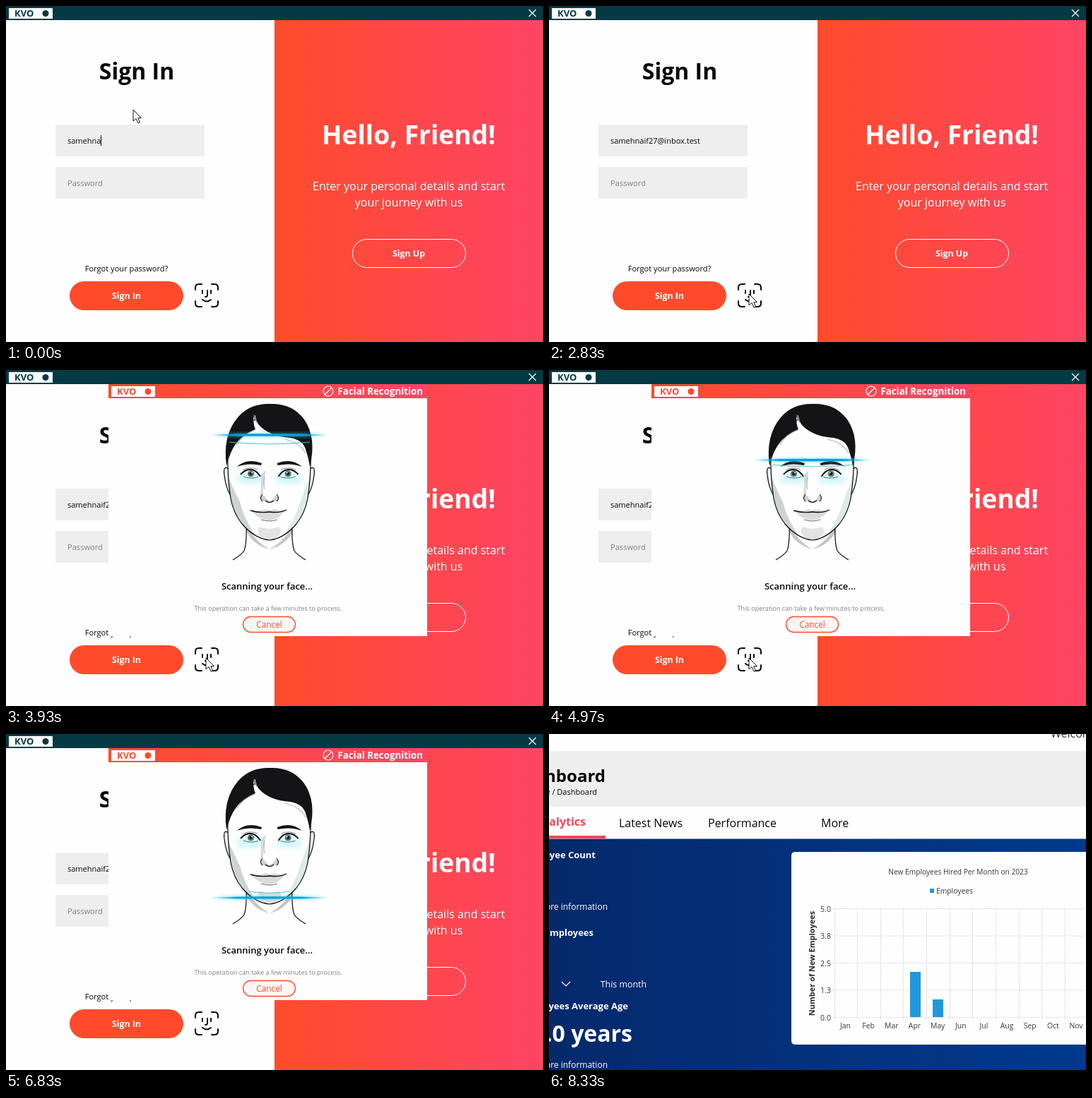
An HTML page with a canvas that plays this animation: 760x476 px, repeating every 8.36 s.

```html
<!DOCTYPE html>
<html lang="en">
<head>
<meta charset="utf-8">
<title>Face sign-in</title>
<style>
html, body { margin: 0; width: 100%; height: 100%; overflow: hidden; background: #fff; }
canvas { display: block; width: 760px; height: 476px; }
</style>
</head>
<body>
<canvas id="stage" width="760" height="476"></canvas>
<script>
const c = document.getElementById('stage').getContext('2d');
const LOOP = 8360;
const SANS = '"Open Sans", "Noto Sans", sans-serif';
const MONO = '"Liberation Mono", monospace';
const ORANGE = '#ff4b2b', PINK = '#ff4465', PAPER = '#fefefe', INK = '#08080a';
const WHITE = '#fff', FIELD = '#eeeeee', BAR = '#033a44';

const EMAIL = 'samehnaif27@inbox.test';
const FIRST = 7;
// time of each key press after the first letters
const KEYS = [110, 270, 500, 770, 800, 970, 1040, 1130, 1230, 1370, 1530, 1600, 1680, 1770, 1870];

const clamp = v => Math.max(0, Math.min(1, v));
const ease = v => v * v * (3 - 2 * v);
const mix = (a, b, k) => a + (b - a) * k;
const span = (t, a, b) => clamp((t - a) / (b - a));

function text(s, x, y, size, color, weight = 400, align = 'left', family = SANS) {
  c.font = `${weight} ${size}px ${family}`;
  c.textAlign = align;
  c.fillStyle = color;
  c.fillText(s, x, y);
  return c.measureText(s).width;
}
function box(x, y, w, h, color) {
  c.fillStyle = color;
  c.fillRect(x, y, w, h);
}
function pill(x, y, w, h, r, fill, stroke, lw = 1) {
  c.beginPath();
  c.roundRect(x, y, w, h, r);
  if (fill) { c.fillStyle = fill; c.fill(); }
  if (stroke) { c.strokeStyle = stroke; c.lineWidth = lw; c.stroke(); }
}
function line(d, color, lw = 1) {
  c.strokeStyle = color;
  c.lineWidth = lw;
  c.stroke(new Path2D(d));
}
function shape(d, color) {
  c.fillStyle = color;
  c.fill(new Path2D(d));
}
function dot(x, y, r, color) {
  c.beginPath();
  c.arc(x, y, r, 0, 7);
  c.fillStyle = color;
  c.fill();
}
function blend(x0, x1, stops) {
  const g = c.createLinearGradient(x0, 0, x1, 0);
  stops.forEach(([at, color]) => g.addColorStop(at, color));
  return g;
}
function mirrored(cx, draw) {
  draw();
  c.save();
  c.translate(2 * cx, 0);
  c.scale(-1, 1);
  draw();
  c.restore();
}

function badge(x, y, color) {
  box(x, y, 62, 15, PAPER);
  text('KVO', x + 8, y + 12, 13, color, 700);
  dot(x + 52, y + 7.5, 4.5, color);
}

function faceIcon() {
  c.lineCap = 'round';
  mirrored(284, () => {
    line('M268 402V399Q268 394 273 394H277M268 418V421Q268 426 273 426H277M278 403V407', INK, 2);
  });
  line('M285 403V410Q285 412 282 412M278 416Q284 421 290 416', INK, 2);
  c.lineCap = 'butt';
}

function signIn(t) {
  box(0, 0, 760, 476, PAPER);
  box(380, 20, 380, 456, blend(380, 760, [[0, ORANGE], [1, PINK]]));
  box(0, 0, 760, 20, BAR);
  badge(4, 3, BAR);
  line('M740 5L750 15M750 5L740 15', WHITE, 1.2);

  text('Sign In', 185, 104, 32, INK, 700, 'center');
  box(70, 168, 211, 45, FIELD);
  box(70, 228, 211, 45, FIELD);
  const typed = EMAIL.slice(0, FIRST + KEYS.filter(k => k <= t).length);
  const w = text(typed, 87, 195, 11, INK);
  if (t < 2400) box(Math.round(87 + w), 183, 1, 15, INK);
  text('Password', 87, 255, 11.1, '#808080');
  text('Forgot your password?', 170.5, 376, 11.1, INK, 400, 'center');
  pill(90, 390, 161, 41, 20.5, ORANGE);
  text('Sign In', 170.5, 415, 12.3, WHITE, 700, 'center');
  faceIcon();

  text('Hello, Friend!', 570, 196, 37.2, WHITE, 700, 'center');
  text('Enter your personal details and start', 570, 261, 16, WHITE, 400, 'center');
  text('your journey with us', 570, 284, 16, WHITE, 400, 'center');
  pill(490.5, 330.5, 160, 40, 20, null, WHITE);
  text('Sign Up', 570, 355, 12.3, WHITE, 700, 'center');
}

function eye() {
  shape('M333 148Q340 140 349 142Q355 144 359 151Q346 154 333 148Z', '#f8fcfc');
  dot(346.5, 147, 4.6, '#5e6a66');
  dot(346.5, 147, 2.3, INK);
  dot(348, 145.5, 1, WHITE);
  line('M332 148Q340 139 349 141.5Q355 143 360 151', INK, 2);
  line('M336 151Q346 155 357 151.5', '#383838', .9);
  line('M335 142Q344 136 356 141', '#555', .7);
  shape('M327 137Q341 124 362 132L361 135Q342 131 327 137Z', '#141416');
}

function face() {
  // neck and shoulders
  shape('M340 217Q342 250 336 258L320 269H424L409 258Q404 250 406 217Z', PAPER);
  shape('M341 219Q349 240 373 254Q397 240 405 219L406 229Q396 248 373 254Q350 248 341 230Z', '#c4c8c4');
  mirrored(372.5, () => {
    line('M340 218Q341 245 337 256Q333 262 321 269', INK, 1.2);
    shape('M316 139Q307 134 309 148Q311 166 317 177Z', '#eef0ee');
    line('M315 140Q307 134 309 149Q311 167 318 178', INK, 1.2);
  });

  const head = 'M314 116Q313 150 318 182Q322 203 334 218Q352 239 373 241Q393 239 411 218Q423 203 427 182Q432 150 431 116Q420 72 372 66Q324 72 314 116Z';
  shape(head, PAPER);
  c.save();
  c.clip(new Path2D(head));
  shape('M312 145Q321 167 331 187Q337 212 356 239L334 232L312 200Z', '#d0d4d0');
  shape('M433 145Q423 167 416 188Q409 212 390 239L414 232L433 200Z', '#dcebe6');
  shape('M359 222Q373 228 386 222Q396 234 373 242Q350 234 359 222Z', '#e2e4e2');
  shape('M368 142Q363 162 364 175L359 181Q363 160 360 149Z', '#d8dad8');
  c.restore();
  line(head, INK, 1.2);

  mirrored(372.8, eye);
  shape('M361 180Q364 174 368 182L373 186L379 182Q382 174 385 180Q386 187 378 186L373 189L366 186Q360 186 361 180Z', '#cdd0cd');
  line('M363 176Q358 182 363 186M383 176Q388 182 383 186M367 185Q373 190 379 185', INK, 1.1);
  line('M366 151Q364 163 366 169', '#8a8c8a', .7);
  shape('M347 200Q360 200 367 197L373 199L379 197Q387 200 396 199Q384 213 372 213Q358 212 347 200Z', '#dadcda');
  line('M346 199Q359 203 373 201Q388 203 397 198', INK, 1.4);
  line('M361 212Q373 216 384 212', '#6c6c6c', 1);

  // hair
  shape('M312 136Q306 92 329 66Q346 47 374 48Q405 47 422 70Q440 96 430 137Q428 124 425 116Q422 99 402 96Q373 94 358 78Q350 71 351 62Q349 76 353 84Q334 92 325 105Q317 116 312 136Z', '#141416');
  line('M352 64Q354 82 374 91Q391 99 405 99', PAPER, 1);
  line('M352 85Q336 91 326 106M394 98Q417 103 424 118', '#b4b6b4', 1.2);
}

function scan(y) {
  c.save();
  c.filter = 'blur(5px)';
  box(328, 150, 34, 9, 'rgba(90,225,245,.4)');
  box(384, 150, 34, 9, 'rgba(90,225,245,.4)');
  c.restore();
  const off = mix(10, -9, span(y, 105, 232));
  const half = y < 180 ? 57 : mix(57, 28, (y - 180) / 52);
  line(`M${373 - half} ${y + off}Q373 ${y + off + 5} ${373 + half} ${y + off}`, 'rgba(70,195,200,.65)', 1.6);

  const faded = (rgb, a) => blend(284, 461,
    [[0, `rgba(${rgb},0)`], [.25, `rgba(${rgb},${a})`], [.75, `rgba(${rgb},${a})`], [1, `rgba(${rgb},0)`]]);
  box(300, y - 5, 145, 10, faded('60,205,235', .16));
  box(292, y - 2.5, 160, 5, faded('60,205,235', .35));
  shape(`M284 ${y}Q330 ${y - 2.2} 373 ${y - 1.8}Q416 ${y - 2.2} 461 ${y}Q416 ${y + 1.6} 373 ${y + 1.5}Q330 ${y + 1.6} 284 ${y}Z`,
    faded('0,160,224', 1));
}

function scanY(t) {
  if (t < 7000) return 80 + 16.65 * Math.pow((Math.min(t, 6830) - 3100) / 1000, 1.68);
  return mix(232, 239, span(t, 7000, 7230));
}

function dialog(t) {
  box(145, 20, 451, 357, PAPER);
  box(145, 20, 451, 20, blend(145, 596, [[0, ORANGE], [1, PINK]]));
  badge(149, 23, ORANGE);
  c.beginPath();
  c.arc(456, 30, 7, 0, 7);
  c.strokeStyle = WHITE;
  c.lineWidth = 1.2;
  c.stroke();
  line('M451 35L461 25', WHITE, 1.2);
  text('Facial Recognition', 590, 35, 13.3, WHITE, 700, 'right');
  face();
  scan(scanY(t));
  text('Scanning your face...', 369.5, 311, 13, INK, 600, 'center');
  text('This operation can take a few minutes to process.', 371, 341, 9.1, '#808080', 400, 'center');
  pill(335.5, 349.5, 74, 22, 11, '#fbf6f4', ORANGE, 1.3);
  text('Cancel', 372.5, 365, 11.8, ORANGE, 400, 'center');
}

function pointer(t) {
  const go = ease(span(t, 2130, 2830)), leave = span(t, 6530, 6830) ** 2;
  if (leave === 1) return;
  const x = mix(mix(180, 283, go), 190, leave), y = mix(mix(147, 408, go), 478, leave);
  c.save();
  c.translate(x, y);
  const arrow = 'M0 0V16L4 12.5L7 19L9.5 18L6.8 11.7H11.5Z';
  shape(arrow, WHITE);
  line(arrow, '#111', 1);
  c.restore();
}

function editor() {
  const gray = '#929292';
  box(0, 0, 760, 476, '#dedede');
  dot(8, 8, 4, '#d3dfe8');
  text('Open a document', 377, 55, 18.8, gray, 400, 'center');
  box(181, 71, 394, 1, '#a0a0a0');
  const put = (s, x, y) => text(s, x, y, 13.5, gray);
  [[99, 'File > Open File or Project (Ctrl+O)'], [121, 'File > Recent Files'],
   [143, 'Tools > Locate (Ctrl+K) and'], [256, 'Drag and drop files here']].forEach(([y, s]) => {
    dot(184.5, y - 4.5, 2.6, gray);
    put(s, 192, y);
  });
  put('- type to open file from any open project', 195, 160);
  [[177, 'c<space><pattern>', ' to jump to a class definition'],
   [196, 'm<space><pattern>', ' to jump to a function definition'],
   [215, 'f<space><filename>', ' to open file from file system']].forEach(([y, code, rest]) => {
    let x = 195 + put('- type ', 195, y);
    x += text(code, x, y, 14, gray, 400, 'left', MONO);
    put(rest, x, y);
  });
  put('- select one of the other filters for jumping to a location', 195, 234);
}

function chart() {
  const ink = '#38383c', grid = '#dcdce6', bar = '#2397dc';
  pill(343, 167, 430, 273, 5, PAPER);
  text('New Employees Hired Per Month on 2023', 579, 199, 10.2, ink, 400, 'center');
  box(539, 219, 6, 6, bar);
  text('Employees', 548, 226, 10.3, ink);
  c.setLineDash([3, 1]);
  ['5.0', '3.8', '2.5', '1.3', '0.0'].forEach((s, i) => {
    const y = 247.5 + i * 38.5;
    line(`M400 ${y}H760`, grid);
    text(s, 399, y + 4, 10.6, ink, 400, 'right');
  });
  'Jan Feb Mar Apr May Jun Jul Aug Sep Oct Nov'.split(' ').forEach((s, i) => {
    const x = 404 + i * 32.65;
    line(`M${Math.floor(x) + .5} 247V405`, grid);
    text(s, x + 15.5, 417, 10.4, ink, 400, 'center');
  });
  c.setLineDash([]);
  box(511, 337, 15, 64, bar);
  box(543, 376, 15, 25, bar);
  c.save();
  c.translate(376, 325);
  c.rotate(-Math.PI / 2);
  text('Number of New Employees', 0, 0, 11, '#28282c', 700, 'center');
  c.restore();
}

function dashboard() {
  box(0, 0, 760, 476, PAPER);
  text('Welcome', 710, 5, 16, '#38383c');
  box(0, 24, 760, 79, FIELD);
  text('Dashboard', 80, 68, 24, INK, 700, 'right');
  text('Home / Dashboard', 68, 86, 11, INK, 400, 'right');
  text('Analytics', 52, 130, 16, '#f6475a', 700, 'right');
  box(0, 144, 80, 4, blend(0, 80, [[0, '#ff4b48'], [1, PINK]]));
  text('Latest News', 99, 132, 16, INK);
  text('Performance', 225, 132, 16, INK);
  text('More', 385, 132, 16, INK);
  box(0, 148, 760, 328, blend(0, 760, [[0, '#05296c'], [1, '#003a8c']]));
  box(0, 148, 760, 1, '#8a9cc4');
  const right = (s, x, y, size = 13, weight = 700) => text(s, x, y, size, WHITE, weight, 'right');
  right('Employee Count', 66, 176);
  right('More information', 83, 249, 12, 400);
  right('New Employees', 63, 286);
  line('M18 351L24 357L30 351', WHITE, 1.2);
  right('This month', 138, 359, 12.4, 400);
  right('Employees Average Age', 112, 390);
  right('0.0 years', 118, 436, 32);
  right('More information', 83, 473, 12, 400);
  chart();
}

function draw(t) {
  if (t >= 8130) {
    editor();
    const k = ease(span(t, 8150, 8330));
    if (!k) return;
    const s = mix(.94, 1, k);
    c.save();
    c.globalAlpha = k;
    c.translate(380, 238);
    c.scale(s, s);
    c.translate(-380, -238);
    dashboard();
    c.restore();
    return;
  }
  signIn(t);
  if (t >= 3100) dialog(t);
  pointer(t);
}

const start = performance.now();
function frame() {
  draw((performance.now() - start) % LOOP);
  requestAnimationFrame(frame);
}
frame();
</script>
</body>
</html>
```
